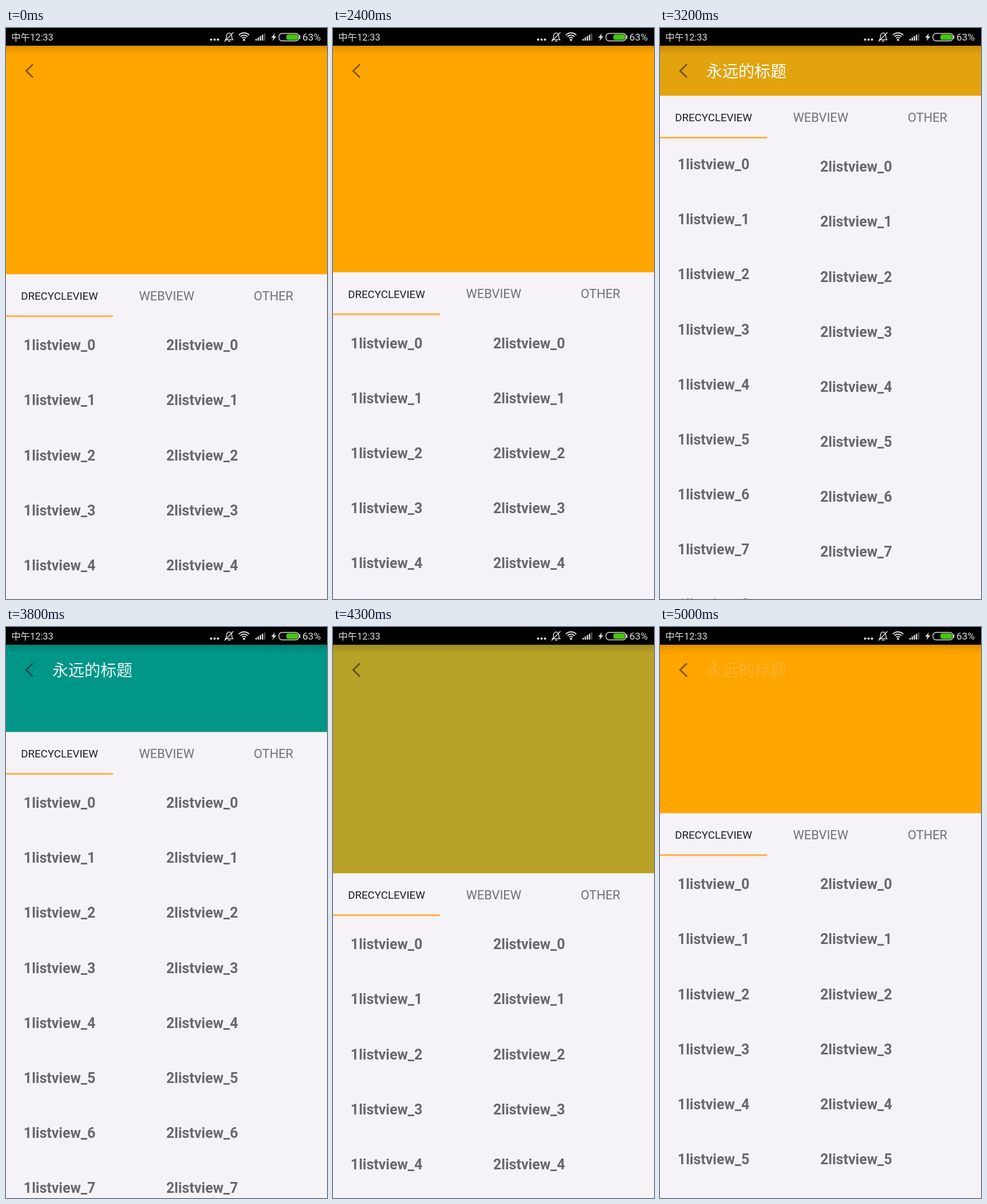
An HTML page with a canvas for the animation above (5100 ms loop, 561 by 998 pixels).

```html
<!DOCTYPE html>
<html lang="zh">
<head>
<meta charset="utf-8">
<style>
  html, body { margin: 0; width: 100%; height: 100%; overflow: hidden; background: #f5f3f7; }
  canvas { display: block; }
</style>
</head>
<body>
<canvas id="stage" width="561" height="998"></canvas>
<script>
const ctx = document.getElementById('stage').getContext('2d');
const W = 561, H = 998;
const LOOP = 5100, STEP = 100;
const BAR = 31, OPEN = 430.4, SHUT = 118.4, TABS = 75, ROW = 96.15;
const FONT = 'Roboto, "Noto Sans CJK SC", "Noto Sans CJK", sans-serif';

const clamp = v => Math.min(1, Math.max(0, v));
const ramp = (t, start, length) => clamp((t - start) / length);

// Lower edge of the collapsing header
function headerEdge(t) {
  const range = OPEN - SHUT;
  if (t < 3600) return OPEN - range * ramp(t, 2270, 920) ** 2.3;
  if (t < 4800) return SHUT + range * ramp(t, 3640, 540) ** 1.29;
  return OPEN - 105 * ramp(t, 4820, 180) ** 1.6;
}

const scrimAlpha = t => ramp(t, 3134, 600) - ramp(t, 3870, 600);
const listScroll = t => 19 * Math.sin(Math.PI * ramp(t, 3170, 440));

function rect(x, y, w, h, color) {
  ctx.fillStyle = color;
  ctx.fillRect(x, y, w, h);
}

function text(str, x, y, size, color, weight = 400, align = 'left') {
  ctx.font = `${weight} ${size}px ${FONT}`;
  ctx.textAlign = align;
  ctx.fillStyle = color;
  ctx.fillText(str, x, y);
}

function line(points, color, width) {
  ctx.beginPath();
  points.forEach(([x, y]) => ctx.lineTo(x, y));
  ctx.strokeStyle = color;
  ctx.lineWidth = width;
  ctx.stroke();
}

function dot(x, y, r, color) {
  ctx.beginPath();
  ctx.arc(x, y, r, 0, Math.PI * 2);
  ctx.fillStyle = color;
  ctx.fill();
}

function pill(x, y, w, h, r) {
  ctx.beginPath();
  ctx.roundRect(x, y, w, h, r);
}

function bell(color) {
  ctx.beginPath();
  ctx.moveTo(383.5, 20.5);
  ctx.quadraticCurveTo(385.5, 18.5, 385.5, 14);
  ctx.bezierCurveTo(385.5, 7, 394.5, 7, 394.5, 14);
  ctx.quadraticCurveTo(394.5, 18.5, 396.5, 20.5);
  ctx.closePath();
  ctx.strokeStyle = color;
  ctx.lineWidth = 1.5;
  ctx.stroke();
  line([[388, 23], [392, 23]], color, 1.5);
  line([[382, 23.5], [397.5, 7.5]], color, 1.5);
}

function wifi(color) {
  ctx.strokeStyle = color;
  ctx.lineWidth = 2;
  for (const r of [4.5, 8.5, 12.5]) {
    ctx.beginPath();
    ctx.arc(416, 21, r, -Math.PI * 0.76, -Math.PI * 0.24);
    ctx.stroke();
  }
  dot(416, 20.8, 2, color);
}

function battery(color) {
  pill(477, 9.5, 35, 13, 5.5);
  ctx.strokeStyle = color;
  ctx.lineWidth = 1.4;
  ctx.stroke();
  rect(512.5, 13, 1.8, 6, color);
  pill(490, 11.3, 20.5, 9.4, 3.5);
  ctx.fillStyle = '#45c60b';
  ctx.fill();
}

function statusBar() {
  const color = '#dedede';
  rect(0, 0, W, BAR, '#000');
  text('中午12:33', 9.2, 22, 16.4, color);
  for (let i = 0; i < 3; i++) dot(358.5 + i * 6, 20.2, 2, color);
  bell(color);
  wifi(color);
  for (let i = 0; i < 5; i++) {
    const h = 3 + i * 2.4;
    rect(436 + i * 3.7, 22 - h, 2.4, h, i < 4 ? color : '#555');
  }
  ctx.beginPath();
  [[470, 9], [463.5, 17], [467.3, 17], [465.5, 23], [472.5, 14.6], [468.6, 14.6]]
    .forEach(([x, y]) => ctx.lineTo(x, y));
  ctx.fillStyle = color;
  ctx.fill();
  battery(color);
  text('63%', 518, 22, 17.3, color);
}

function header(t, edge) {
  rect(0, BAR, W, edge - BAR, '#ffa500');
  ctx.globalAlpha = scrimAlpha(t);
  rect(0, BAR, W, edge - BAR, '#009688');
  ctx.globalAlpha = 1;

  const shade = ctx.createLinearGradient(0, BAR, 0, BAR + 15);
  shade.addColorStop(0, 'rgba(0,0,0,.13)');
  shade.addColorStop(1, 'rgba(0,0,0,0)');
  rect(0, BAR, W, 15, shade);

  line([[47, 63.5], [35.3, 75], [47, 86.5]], 'rgba(0,0,0,.48)', 2.9);

  const folded = (OPEN - edge) / (OPEN - SHUT);
  ctx.globalAlpha = clamp((folded - 0.24) / 0.6);
  text('永远的标题', 81, 86, 28, '#fff', 500);
  ctx.globalAlpha = 1;
}

function tabs(edge) {
  rect(0, edge, W, TABS, '#f5f3f7');
  text('DRECYCLEVIEW', 93.5, edge + 45, 18.7, '#1d1c1f', 400, 'center');
  text('WEBVIEW', 280.8, edge + 45.5, 21.8, '#727075', 400, 'center');
  text('OTHER', 467.5, edge + 45.5, 21.8, '#727075', 400, 'center');
  rect(0, edge + 71.8, 187, 3, '#ffb042');
}

function list(column, x, top) {
  for (let i = 0; i < 10; i++) {
    text(`${column}listview_${i}`, x, top + i * ROW, 25, '#69676c', 700);
  }
}

function draw(t) {
  const edge = headerEdge(t);
  rect(0, 0, W, H, '#f5f3f7');
  list(1, 30.8, edge + 132.8 - listScroll(t));
  list(2, 280, edge + 132.8);
  tabs(edge);
  header(t, edge);
  statusBar();
}

const start = performance.now();
function tick() {
  const t = (performance.now() - start) % LOOP;
  draw(Math.floor(t / STEP) * STEP);
  requestAnimationFrame(tick);
}
tick();
</script>
</body>
</html>
```
